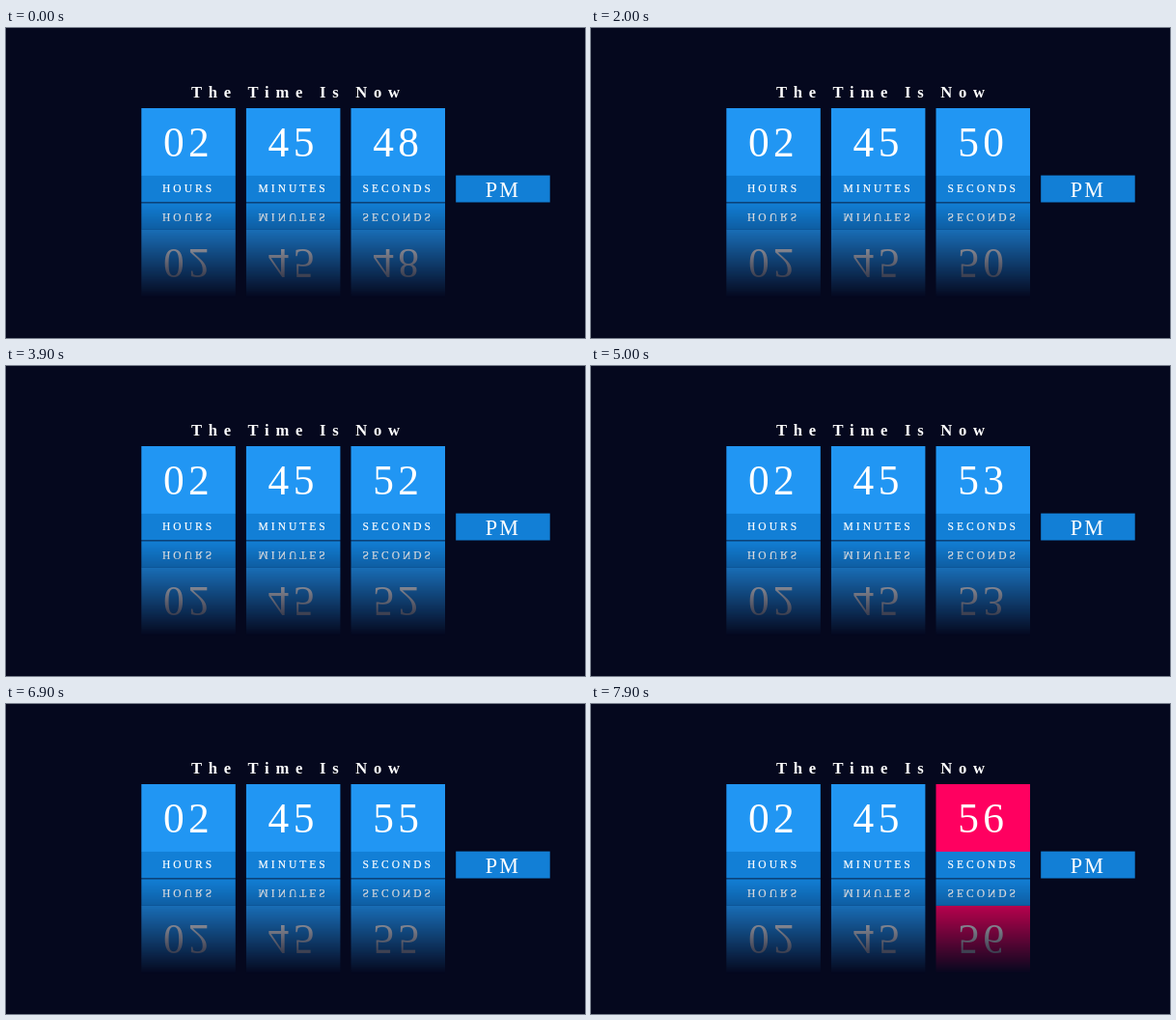
An HTML page that plays this animation: 600x321 px, repeating every 8 s.

```html
<!DOCTYPE html>
<html lang="en">
<head>
<meta charset="utf-8">
<title>Digital clock</title>
<style>
  html, body { margin: 0; width: 100%; height: 100%; overflow: hidden; background: #05081e; }
  svg { display: block; width: 100%; height: 100%; }
  text { font-family: "Liberation Serif", "Times New Roman", serif; fill: #fff; white-space: pre; }
  .title { font-size: 16.6px; font-weight: bold; letter-spacing: 6.75px; }
  .digits { font-size: 43.4px; letter-spacing: .1em; text-anchor: middle; }
  .label { font-size: 11.5px; letter-spacing: 3px; text-anchor: middle; stroke: #fff; stroke-width: .2px; }
  .period { font-size: 22.2px; letter-spacing: .1em; text-anchor: middle; }
  .face { fill: #2196f3; }
  .base { fill: #127fd6; }
  .hover .face { fill: #ff0060; }
</style>
</head>
<body>
<svg viewBox="0 0 600 321">
  <defs>
    <linearGradient id="fade" x1="0" y1="0" x2="0" y2="1">
      <stop offset="0" stop-color="#fff"/>
      <stop offset="1" stop-color="#fff" stop-opacity="0"/>
    </linearGradient>
    <mask id="fadeMask" maskUnits="userSpaceOnUse" x="0" y="181" width="600" height="98" style="mask-type: alpha">
      <rect y="181" width="600" height="98" fill="url(#fade)"/>
    </mask>
  </defs>
  <text class="title" x="192" y="72">The Time Is Now</text>
  <g id="cards"></g>
  <g mask="url(#fadeMask)"><use href="#cards" transform="matrix(1 0 0 -1 0 361.8)"/></g>
  <rect class="base" x="466.2" y="152.6" width="97.5" height="27.9"/>
  <text class="period" x="515" y="174.5">PM</text>
</svg>
<script>
  const LOOP = 8000, STEP = 100;
  const START_SECOND = 48;
  const TICKS = [1000, 2000, 2900, 3900, 4900, 5900, 6900, 7900];
  const HOVER_START = 7900;
  const CARD_WIDTH = 97.5, CARD_PITCH = 108.6;

  const card = ([value, label], index) => {
    const x = 140.3 + index * CARD_PITCH, center = x + CARD_WIDTH / 2;
    return `<g>
      <rect class="face" x="${x}" y="83" width="${CARD_WIDTH}" height="70"/>
      <rect class="base" x="${x}" y="152.9" width="${CARD_WIDTH}" height="27.6"/>
      <text class="digits" x="${center}" y="132.5">${value}</text>
      <text class="label" x="${center}" y="170.3">${label}</text>
    </g>`;
  };

  const cards = document.getElementById("cards");
  cards.innerHTML = [["02", "HOURS"], ["45", "MINUTES"], [START_SECOND, "SECONDS"]].map(card).join("");
  const secondsCard = cards.lastElementChild;
  const secondsText = secondsCard.querySelector(".digits");

  let shown = START_SECOND;
  function draw(now) {
    const time = Math.floor((now % LOOP) / STEP) * STEP;
    const second = START_SECOND + TICKS.filter(tick => time >= tick).length;
    if (second !== shown) secondsText.textContent = shown = second;
    secondsCard.classList.toggle("hover", time >= HOVER_START);
  }

  const start = performance.now();
  function frame() {
    draw(performance.now() - start);
    requestAnimationFrame(frame);
  }
  frame();
</script>
</body>
</html>
```
